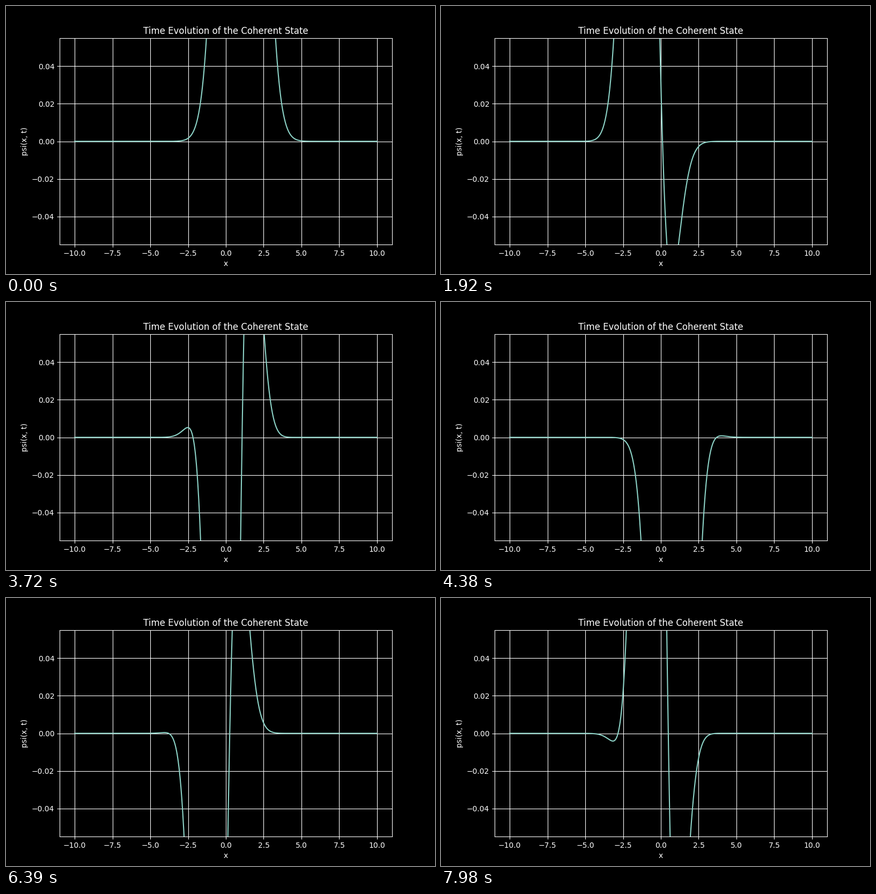
A matplotlib script that plays this animation: 800 px wide and 500 px high, repeating every 8 s.

```python
import numpy as np
import matplotlib.pyplot as plt
from matplotlib.animation import FuncAnimation

LOOP_MS = 8000
TICK_MS = 20       # timer step
STEP_MS = 30       # time between changes of the curve
X0 = 1.0           # initial displacement of the wave packet

plt.style.use("dark_background")

x = np.linspace(-10, 10, 1000)
times = np.linspace(0, 20, 500)


def psi(x, t):
    """Real part of a coherent state of the harmonic oscillator."""
    centre = X0 * np.cos(t)
    phase = -t / 2 - X0 * x * np.sin(t) + X0**2 * np.sin(2 * t) / 4
    return np.pi**-0.25 * np.exp(-(x - centre) ** 2 / 2) * np.cos(phase)


fig, ax = plt.subplots(figsize=(8, 5), dpi=100)
line, = ax.plot(x, psi(x, 0), color="#8dd3c7", lw=1.5)
ax.set_xlim(-11, 11)
ax.set_ylim(-0.055, 0.055)
ax.set_title("Time Evolution of the Coherent State")
ax.set_xlabel("x")
ax.set_ylabel("psi(x, t)")
ax.grid(True)


def update(i):
    step = (i * TICK_MS + TICK_MS // 2) // STEP_MS
    line.set_ydata(psi(x, times[step]))
    return line,


anim = FuncAnimation(fig, update, frames=LOOP_MS // TICK_MS,
                     interval=TICK_MS, repeat=True, repeat_delay=0)
plt.show()
```
